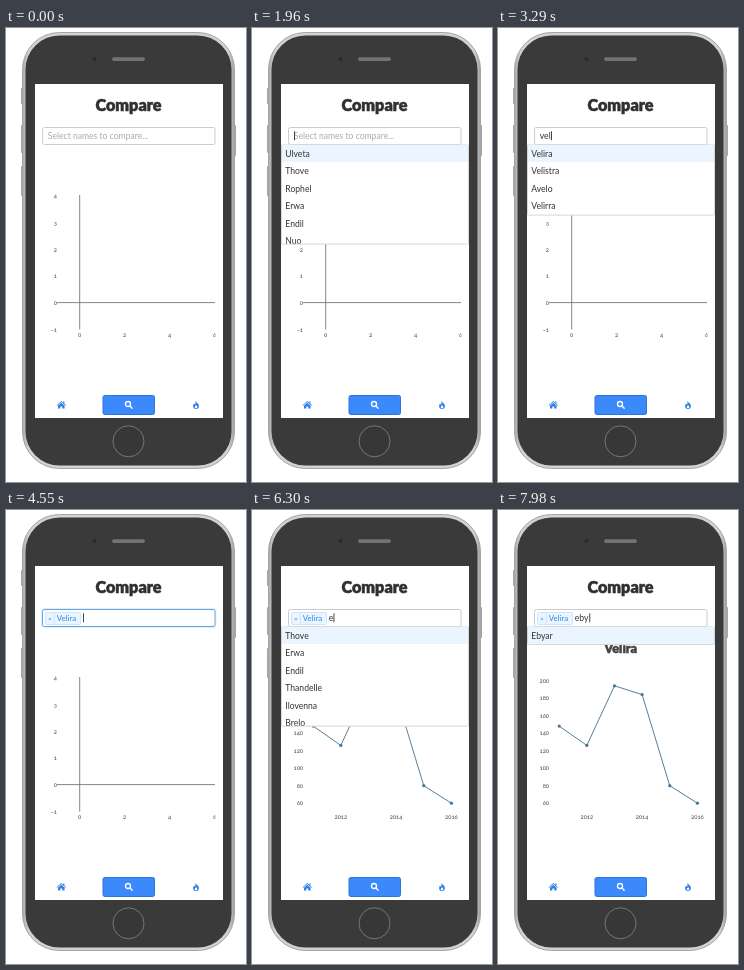
An HTML page that plays this animation: 240 by 454 pixels, repeating every 8 s.

```html
<!DOCTYPE html>
<html lang="en">
<head>
<meta charset="utf-8">
<title>Compare names</title>
<style>
  html, body { margin: 0; width: 100%; height: 100%; overflow: hidden; background: #fff; }
  svg { display: block; width: 100vw; height: 100vh; font-family: Lato, "Open Sans", sans-serif; }
  .head { font-weight: 900; text-anchor: middle; stroke-width: .5; stroke-linejoin: round; }
  .entry { font-size: 8.6px; fill: #333; }
  .hint { fill: #aaa; }
  .axis { font-size: 5.9px; fill: #444; font-variant-numeric: oldstyle-nums; }
  .end { text-anchor: end; }
  .mid { text-anchor: middle; }
  .icon { fill: #2f7fe6; }
</style>
</head>
<body>
<svg viewBox="0 0 240 454">
  <defs>
    <linearGradient id="rim" x2="1">
      <stop offset="0" stop-color="#a9a9ab"/>
      <stop offset=".03" stop-color="#d2d2d4"/>
      <stop offset=".97" stop-color="#d2d2d4"/>
      <stop offset="1" stop-color="#a0a0a2"/>
    </linearGradient>
    <clipPath id="screen"><rect x="29" y="56" width="188" height="334"/></clipPath>
    <clipPath id="plot"><rect x="36" y="150" width="173.5" height="165"/></clipPath>
    <clipPath id="menuClip"><rect id="menuBox" x="29" y="116.5" width="188"/></clipPath>
  </defs>

  <g fill="#a5a5a7">
    <rect x="15" y="60" width="4" height="16" rx="1"/>
    <rect x="15" y="97" width="4" height="28" rx="1"/>
    <rect x="15" y="138" width="4" height="30" rx="1"/>
    <rect x="226" y="97" width="4" height="31" rx="1"/>
  </g>
  <rect x="16.5" y="4.5" width="212" height="436" rx="37" fill="url(#rim)" stroke="#a4a4a6"/>
  <rect x="19.5" y="7.5" width="206" height="430" rx="34" fill="#3a3a3b"/>
  <circle cx="88.5" cy="31" r="2" fill="#29292f"/>
  <rect x="106" y="29.3" width="33" height="3.6" rx="1.8" fill="#737375"/>
  <circle cx="122.5" cy="413.3" r="15.5" fill="#373738" stroke="#777779"/>

  <g clip-path="url(#screen)">
    <rect x="29" y="56" width="188" height="334" fill="#fff"/>
    <text class="head" x="122.5" y="83" font-size="16.2" fill="#303030" stroke="#303030">Compare</text>
    <g id="chart" clip-path="url(#plot)"></g>
    <text id="title" class="head" x="122.7" y="142.6" font-size="12.8" fill="#444" stroke="#444"></text>

    <rect id="glow" x="36.5" y="99.5" width="172.5" height="17" rx="2.5" fill="none" stroke="#007eff" stroke-opacity=".13" stroke-width="3"/>
    <rect id="field" x="36.5" y="99.5" width="172.5" height="17" rx="2" fill="#fff"/>
    <g id="tag">
      <rect x="39.5" y="102.5" width="35" height="12" rx="1" fill="#ebf5ff" stroke="#c2e0ff" stroke-width=".8"/>
      <path d="M48.3 102.5v12" stroke="#c2e0ff" stroke-width=".8"/>
      <text class="mid" x="44" y="110.8" font-size="6.5" fill="#2688e8">×</text>
      <text id="tagName" x="50.8" y="111.2" font-size="7.9" fill="#2688e8"></text>
    </g>
    <text id="typed" class="entry" y="110.5"></text>
    <rect id="caret" y="103.3" width=".9" height="9" fill="#333"/>
    <g id="menu" clip-path="url(#menuClip)"></g>

    <rect x="97" y="367.5" width="51.5" height="19" rx="1.8" fill="#3b89fa" stroke="#2c75dc"/>
    <g fill="none" stroke="#fff" stroke-width="1.3" stroke-linecap="round">
      <circle cx="122" cy="376" r="2.5"/>
      <path d="M124 378l2.2 2.2"/>
    </g>
    <g class="icon">
      <path d="M50.6 377.2l4.7-4.2 1.9 1.7v-1.2h1.2v2.2l1.7 1.5-.5.6-4.3-3.8-4.2 3.8z"/>
      <path d="M52 377.7l3.3-2.9 3.3 2.9v2.9h-2.3v-2.2h-2v2.2H52z"/>
      <path fill-rule="evenodd" d="M189.4 372.8c.5 1.8 3.5 2.6 3.5 5.3a2.9 2.9 0 0 1-5.8 0c0-1.2.6-2 1.2-2.6.1.7.4 1.1.8 1.1.9 0 .1-1.8.3-3.8zM190.3 377.2c-.9.6-1.5 1-1.5 1.8a1.2 1.2 0 0 0 2.5 0c0-.7-.6-1-.9-1.8z"/>
    </g>
  </g>
</svg>

<script>
const LOOP = 8000, ROW = 17.5, TOP = 116.5;
const $ = id => document.getElementById(id);
const pick = 'Velira';

// Each step changes only the fields it lists; caret is an x position, 0 when hidden.
const start = { text: '', list: null, caret: 0, focus: false, tag: false, data: false };
const steps = [
  [0, {}],
  [1960, { focus: true, caret: 42, list: 'Ulveta Thove Rophel Erwa Endil Nuo' }],
  [2380, { caret: 0 }],
  [2800, { text: 'v', caret: 46.6, list: 'Ulveta Arvo Ivoa Evrin Nuvo Savit' }],
  [3080, { text: 've', caret: 51, list: 'Ulveta Overn Vesko Ivena Velira Sivet' }],
  [3290, { text: 'vel', caret: 53, list: 'Velira Velistra Avelo Velirra' }],
  [3850, { caret: 0 }],
  [4340, { caret: 53 }],
  [4550, { text: '', caret: 77, list: null, tag: true }],
  [5040, { caret: 0 }],
  [5250, { data: true }],
  [5530, { caret: 77 }],
  [6090, { caret: 0 }],
  [6300, { text: 'e', caret: 81.5, list: 'Thove Erwa Endil Thandelle Ilovenna Brelo' }],
  [6580, { text: 'eb', caret: 86.5, list: 'Ebrin Neba Thebel Rebo Ebyar Webran' }],
  [6790, { text: 'eby', caret: 91.3, list: 'Ebyar' }],
  [7280, { caret: 0 }],
  [7840, { caret: 91.3 }]
];
let last = start;
const states = steps.map(([at, change]) => last = { ...last, ...change, at });

const label = (x, y, text, cls) => `<text class="axis ${cls}" x="${x}" y="${y + 2.1}">${text}</text>`;
const line = d => `<path d="${d}" fill="none" stroke="#777" stroke-width=".9"/>`;

function emptyChart() {
  let out = line('M73.7 167V301.5M51 274.6H209');
  for (let v = -1; v <= 4; v++) out += label(51, 274.8 - v * 26.7, v < 0 ? '−' + -v : v, 'end');
  for (let v = 0; v <= 6; v += 2) out += label(73.7 + v * 22.5, 306.5, v, 'mid');
  return out;
}

function dataChart() {
  const x = year => 61.2 + (year - 2011) * 27.64;
  const y = v => 293.2 - (v - 60) * .876;
  const pts = [148, 126, 194, 184, 80, 60].map((v, i) => [x(2011 + i), y(v)]);
  let out = `<polyline points="${pts.join(' ')}" fill="none" stroke="#557f9b" stroke-width="1"/>`;
  for (const [cx, cy] of pts) out += `<circle cx="${cx}" cy="${cy}" r="1.6" fill="#4a7592"/>`;
  for (let v = 60; v <= 200; v += 20) out += label(51, y(v), v, 'end');
  for (let t = 2012; t <= 2016; t += 2) out += label(x(t), 306.5, t, 'mid');
  return out;
}

function menu(list) {
  if (!list) return '';
  const names = list.split(' ');
  const h = Math.min(names.length * ROW + 1, 100);
  $('menuBox').setAttribute('height', h + .5);
  const rows = names.map((n, i) =>
    `<text class="entry" x="33.3" y="${TOP + 12.4 + i * ROW}">${n}</text>`).join('');
  return `<rect x="29" y="${TOP}" width="188" height="${h}" fill="#fff"/>
    <rect x="29" y="${TOP}" width="188" height="${ROW}" fill="#ebf5ff"/>${rows}
    <rect x="29.4" y="${TOP}" width="187.2" height="${h - .4}" rx="1" fill="none" stroke="#ccc" stroke-width=".8"/>`;
}

const charts = [emptyChart(), dataChart()];
const show = (id, on) => $(id).setAttribute('visibility', on ? 'visible' : 'hidden');

function render(s) {
  const hint = !s.text && !s.tag;
  const active = s.focus && !s.list;
  $('chart').innerHTML = charts[+s.data];
  $('title').textContent = s.data ? pick : '';
  $('tagName').textContent = pick;
  show('tag', s.tag);
  show('glow', active);
  $('field').setAttribute('stroke', active ? '#69a5da' : '#ccc');
  $('typed').textContent = hint ? 'Select names to compare...' : s.text;
  $('typed').setAttribute('class', hint ? 'entry hint' : 'entry');
  $('typed').setAttribute('x', s.tag ? 76.8 : 41.8);
  show('caret', s.caret);
  $('caret').setAttribute('x', s.caret);
  $('menu').innerHTML = menu(s.list);
}

let shown = null;
const began = performance.now();
function tick(now) {
  const t = Math.max(0, now - began) % LOOP;
  const state = states.findLast(s => s.at <= t);
  if (state !== shown) render(shown = state);
  requestAnimationFrame(tick);
}
tick(began);
</script>
</body>
</html>
```
